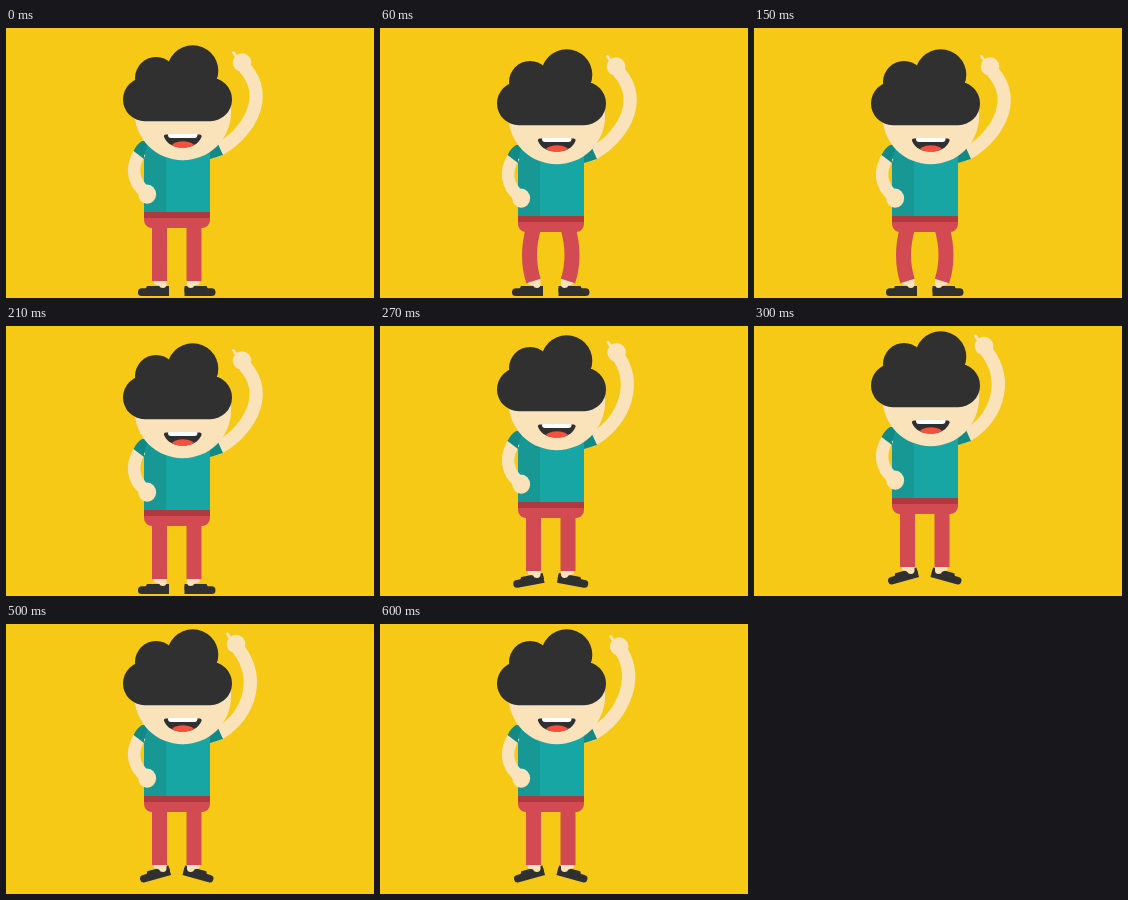
An HTML page with a canvas for the animation above (0.7 s loop, 368 by 270 pixels).

```html
<!DOCTYPE html>
<html lang="en">
<head>
<meta charset="utf-8">
<title>Jumping boy</title>
<style>
html, body { margin: 0; width: 100%; height: 100%; overflow: hidden; background: #f6c917; }
canvas { display: block; width: 368px; height: 270px; }
</style>
</head>
<body>
<canvas id="stage"></canvas>
<script>
const W = 368, H = 270, LOOP = 700;
const BG = '#f6c917', SKIN = '#fae3ba', DARK = '#303030', PANTS = '#d24a52', BELT = '#b0393f';
const SHIRT = '#17a6a3', SHADE = '#189894', SLEEVE = '#128984';

const canvas = document.getElementById('stage');
const ctx = canvas.getContext('2d');
const ratio = window.devicePixelRatio || 1;
canvas.width = W * ratio;
canvas.height = H * ratio;

// Arm poses: hand centre and how far the elbow bulges
const REST = { x: 236, y: 34.5, bulge: 266 };
const STRETCH = { x: 236.6, y: 34.3, bulge: 259 };
const OUT = { x: 239.2, y: 34.5, bulge: 259.5 };
const IN = { x: 230, y: 32, bulge: 257 };

// Crouch and take-off heights, one per 30 ms; then held in the air
const HEIGHTS = [0, 2, 4, 6, 7, 4, 2, 0, -4, -8];
const AIR = -12;

function poseAt(t) {
  if (t >= 300) return { dy: AIR, arm: Math.floor(t / 100) % 2 ? IN : OUT };
  const dy = HEIGHTS[Math.floor(t / 30)];
  return { dy, arm: dy < 0 ? STRETCH : REST };
}

function fill(color, path) {
  ctx.fillStyle = color;
  ctx.fill(typeof path === 'string' ? new Path2D(path) : path);
}

function stroke(color, width, path, cap = 'butt') {
  ctx.strokeStyle = color;
  ctx.lineWidth = width;
  ctx.lineCap = cap;
  ctx.stroke(new Path2D(path));
}

function oval(color, x, y, rx, ry = rx) {
  const p = new Path2D();
  p.ellipse(x, y, rx, ry, 0, 0, Math.PI * 2);
  fill(color, p);
}

function box(color, x, y, w, h, r = 0) {
  const p = new Path2D();
  p.roundRect(x, y, w, h, r);
  fill(color, p);
}

function leg(dy) {
  const lift = Math.min(dy, 0), bend = Math.max(dy, 0);
  const foot = 253 + lift;

  ctx.save();
  ctx.translate(146, 258 + lift);
  ctx.rotate(lift * 1.3 * Math.PI / 180);
  ctx.translate(-146, -258);
  box(DARK, 132, 260.3, 31, 7.7, [4, 0, 0, 4]);
  fill(DARK, 'M139 262L141 258H163V264H139Z');
  ctx.restore();

  fill(SKIN, `M148 ${foot - 2}H160.5V${foot + 4}Q160 ${foot + 7} 157 ${foot + 7}Q154 ${foot + 7} 153 ${foot + 4.5}L148 ${foot + 3}Z`);
  stroke(PANTS, 15, `M153.5 ${196 + dy}Q${153.5 - bend * 2} ${226 + dy / 2} 153.5 ${foot}`);
}

function legs(dy) {
  leg(dy);
  ctx.save();
  ctx.translate(341.5, 0);
  ctx.scale(-1, 1);
  leg(dy);
  ctx.restore();
}

function raisedArm(a) {
  stroke(SKIN, 13.3, `M210 123C240 108 ${a.bulge} 70 ${a.x + 2.5} ${a.y + 5}`);
  oval(SKIN, a.x, a.y, 9.3);
  stroke(SKIN, 3, `M${a.x - 3} ${a.y - 2}L${a.x - 8.5} ${a.y - 10}`, 'round');
  fill(SLEEVE, 'M202 113L212 116L217 127L204 131Z');
}

function torso() {
  box(PANTS, 138, 184, 66, 16, [0, 0, 8, 8]);
  box(BELT, 138, 184, 66, 6);
  box(SHIRT, 138, 113, 66, 71);
  box(SHADE, 138, 113, 22, 71);
}

function loweredArm() {
  stroke(SKIN, 12.5, 'M134 124C125.5 138 125 153 140 165');
  oval(SKIN, 141.2, 166.2, 8.9, 9.6);
  fill(SLEEVE, 'M142 113H136Q131 116 127.5 123L138 131V128Z');
}

function mouth() {
  const lips = new Path2D('M160 106.5H193.5Q196 106.5 195.5 109C192.5 116.5 185 119.6 176.8 119.6C168.500 119.6 161 116.5 158 109Q157.500 106.500 160 106.5Z');
  fill(DARK, lips);
  ctx.save();
  ctx.clip(lips);
  oval('#f4513e', 177, 119.5, 12, 6.3);
  ctx.restore();
  box('#fff', 162, 106, 29.5, 4, [1, 1, 3, 3]);
}

function head() {
  oval(SKIN, 176.8, 84, 48.3);
  oval(DARK, 150, 50, 21);
  oval(DARK, 186.7, 42.8, 25.6);
  box(DARK, 117, 49.5, 109, 43.7, 21.8);
  mouth();
}

function draw(t) {
  const { dy, arm } = poseAt(t);
  ctx.setTransform(ratio, 0, 0, ratio, 0, 0);
  ctx.fillStyle = BG;
  ctx.fillRect(0, 0, W, H);
  legs(dy);
  ctx.translate(0, dy);
  raisedArm(arm);
  torso();
  loweredArm();
  head();
}

const start = performance.now();
function tick() {
  draw((performance.now() - start) % LOOP);
  requestAnimationFrame(tick);
}
tick();
</script>
</body>
</html>
```
